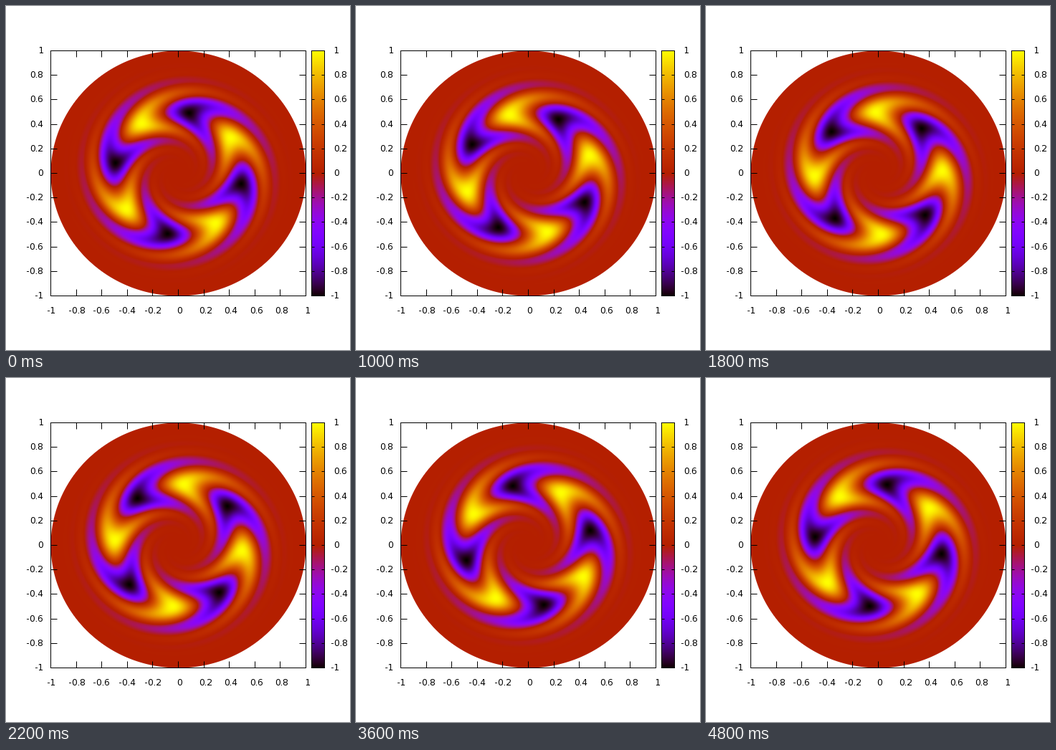
Recreate the animation shown at these times as a matplotlib script. Size 480x480 px, loop 4900 ms.

```python
import numpy as np
import matplotlib.pyplot as plt
from matplotlib.animation import FuncAnimation

SIZE, DPI = 480, 100
FRAMES, STEP_MS = 49, 100
LEFT, RIGHT, TOP, BOTTOM = 62.5, 418.5, 62.5, 404.5
BAR_L, BAR_R = 426.5, 444.5
MODES = 4
RADIUS, DECAY, CHIRP = 0.5, 40.0, 80.0
START = np.radians(35.2)
PX = 72 / DPI
TICK = 9

# Whole-pixel glyph advances
plt.rcParams.update({"font.family": "DejaVu Sans", "text.hinting_factor": 1})


def palette(v):
    """Map values in -1..1 to black-violet-red-yellow."""
    x = np.clip((v + 1) / 2, 0, 1)
    rgb = [np.sqrt(x), x**3, np.sin(2 * np.pi * x)]
    return np.clip(np.stack(rgb, axis=-1), 0, 1)


def line(x, y, cap="butt"):
    ax.plot(x, y, color="black", lw=PX, snap=False,
            solid_capstyle=cap, solid_joinstyle="miter", zorder=3)


def box(x0, x1):
    line([x0, x1, x1, x0, x0], [TOP, TOP, BOTTOM, BOTTOM, TOP], "projecting")


def label(x, y, s, ha):
    ax.text(x, y, s, ha=ha, va="baseline", fontsize=12 * PX)


fig = plt.figure(figsize=(SIZE / DPI, SIZE / DPI), dpi=DPI, facecolor="white")
ax = fig.add_axes([0, 0, 1, 1])
ax.axis("off")

# Polar coordinates of every pixel centre inside the plot box
cols = np.arange(LEFT, RIGHT + 1)
rows = np.arange(TOP, BOTTOM + 1)
half_w, half_h = (RIGHT - LEFT) / 2, (BOTTOM - TOP) / 2
X, Y = np.meshgrid((cols - LEFT) / half_w - 1, 1 - (rows - TOP) / half_h)
r, theta = np.hypot(X, Y), np.arctan2(Y, X)
d2 = (r - RADIUS) ** 2
envelope = np.exp(-DECAY * d2)
phase = MODES * (theta - START) + CHIRP * d2
cover = np.clip((1 - r) * half_w + 0.5, 0, 1)[..., None]


def field(i):
    turn = 2 * np.pi * i / FRAMES
    rgb = palette(envelope * np.cos(phase + turn))
    return rgb * cover + 1 - cover


def picture(rgb, x0, x1):
    return ax.imshow(rgb, interpolation="nearest", aspect="auto", zorder=1,
                     extent=(x0, x1, BOTTOM + 0.5, TOP - 0.5))


disk = picture(field(0), LEFT - 0.5, RIGHT + 0.5)
ramp = palette(np.linspace(1, -1, len(rows)))[:, None, :]
picture(ramp, BAR_L - 0.5, BAR_R + 0.5)
ax.set_xlim(0, SIZE)
ax.set_ylim(SIZE, 0)

box(LEFT, RIGHT)
box(BAR_L, BAR_R)

for n in range(-5, 6):
    text = f"{n / 5:g}"
    pad = 4 if n >= 0 else 0
    x = np.floor(LEFT + (n + 5) / 10 * (RIGHT - LEFT)) + 0.5
    y = np.floor(BOTTOM - (n + 5) / 10 * (BOTTOM - TOP)) + 0.5
    line([x, x], [BOTTOM, BOTTOM - TICK])
    line([x, x], [TOP, TOP + TICK])
    line([LEFT, LEFT + TICK], [y, y])
    line([RIGHT, RIGHT - TICK], [y, y])
    line([BAR_L, BAR_L + 4], [y, y])
    line([BAR_R, BAR_R - 4], [y, y])
    base = y + 3.5
    label(x + pad / 2, 429, text, "center")
    label(52, base, text, "right")
    label(453 + pad, base, text, "left")


def update(i):
    disk.set_data(field(i))
    return [disk]


anim = FuncAnimation(fig, update, frames=FRAMES, interval=STEP_MS,
                     repeat=True, repeat_delay=0, blit=False)
plt.show()
```
